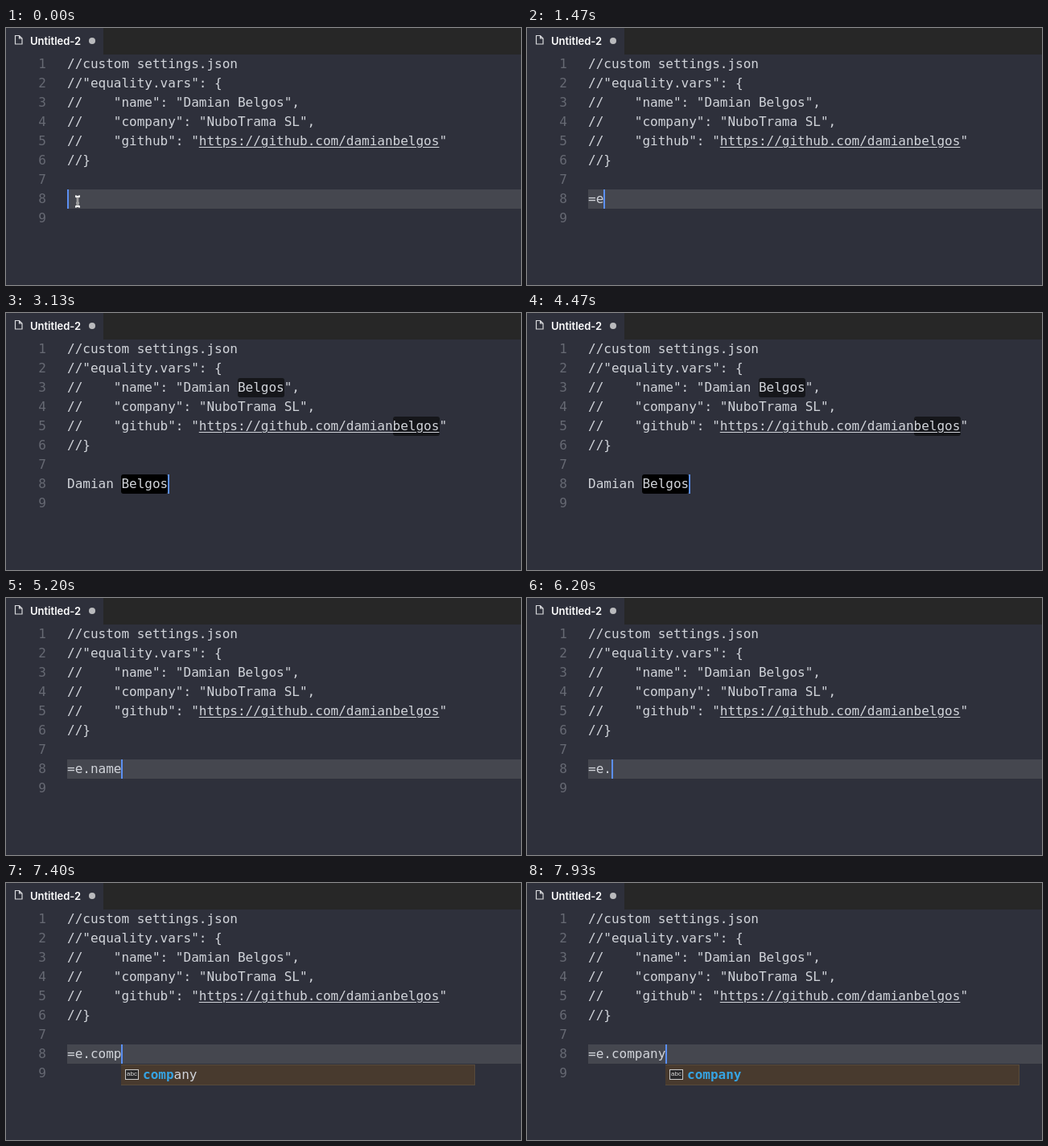
Write an HTML page that moves like this. It is 640 px wide and 320 px high and loops after 8 s.

```html
<!DOCTYPE html>
<html lang="en">
<head>
<meta charset="utf-8">
<title>Editor</title>
<style>
  html, body { margin: 0; width: 100%; height: 100%; overflow: hidden; background: #2e303b; }
  #stage {
    position: relative; width: 640px; height: 320px; overflow: hidden;
    background: #2e303b; color: #d1d4da;
    font: 16px/24px "DejaVu Sans Mono", "Liberation Mono", monospace;
  }
  #stage div, #stage svg { position: absolute; }
  #marks, #code { left: 0; top: 0; }
  .bar { left: 0; top: 0; width: 640px; height: 33px; background: #272727; }
  .tab { left: 0; top: 0; width: 121px; height: 33px; background: #2e303b; }
  .title { left: 30px; top: 4px; color: #fff; font: 600 13px/24px Inter, "Open Sans", sans-serif; white-space: nowrap; }
  .dot { left: 103px; top: 11.5px; width: 8px; height: 8px; border-radius: 50%; background: #b9babd; }
  .num { left: 0; width: 50px; text-align: right; color: #666973; }
  .line { height: 24px; white-space: pre; }
  .line u { text-decoration-thickness: 1px; text-underline-offset: 2px; }
  .mark { height: 24px; width: 58px; border-radius: 3px; background: #15161a; }
  #row { left: 76px; top: 201px; width: 564px; height: 24px; background: #45474f; }
  #caret { top: 201px; width: 2px; height: 24px; background: #5b8ff2; }
  #popup {
    top: 226px; width: 440px; box-sizing: border-box;
    border: 1px solid #574a3b; background: #303031;
  }
  #popup .item { position: relative; height: 24px; margin-left: -1px; padding-left: 27px; line-height: 23px; }
  #popup .item:first-child { background: #483a2e; }
  #popup b { color: #36a3e2; }
  #popup i {
    position: absolute; left: 5px; top: 5px; width: 15px; height: 11px;
    border: 1px solid #c8c8c8; background: #28282a; color: #d8d8d8;
    font: 8px/10px "Liberation Sans", sans-serif; text-align: center;
  }
</style>
</head>
<body>
<div id="stage">
  <div class="bar"></div>
  <div class="tab"></div>
  <svg width="24" height="24" style="left:4px;top:3px" fill="none" stroke="#d8d9dc" stroke-width="1.2">
    <path d="M7.5 6.5h5l3.5 3.5v7h-8.5zM12.5 6.5v3.5h3.5"/>
  </svg>
  <div class="title">Untitled-2</div>
  <div class="dot"></div>
  <div id="row"></div>
  <div id="marks"></div>
  <div id="code"></div>
  <div id="caret"></div>
  <div id="popup"></div>
  <svg id="mouse" width="12" height="18" style="left:83px;top:207px" fill="none">
    <path d="M3 2.5Q6 2.5 6 5Q6 2.5 9 2.5M6 5V13M3 15.5Q6 15.5 6 13Q6 15.5 9 15.5M4.5 11h3" stroke="#f2f2f2" stroke-width="2.4"/>
    <path d="M6 4V14" stroke="#333" stroke-width=".9"/>
  </svg>
</div>
<script>
  const LOOP = 8000, CHAR = 9.632, LEFT = 76, TOP = 33, ROW = 24;
  const FULL = "Damian Belgos";
  const LINES = [
    "//custom settings.json",
    '//"equality.vars": {',
    `//    "name": "${FULL}",`,
    '//    "company": "NuboTrama SL",',
    '//    "github": "<u>https://github.com/damianbelgos</u>"',
    "//}", "", "", ""
  ];
  const WORDS = ["com", "company", "custom", "equality", "name"];

  // time, text on line 8, delay of the suggestion list (none if absent)
  const EDITS = [
    [-600, ""], [1200, "="], [1400, "=e", 125], [2000, "=e."],
    [2325, "=e.n", 0], [2470, "=e.na", 0], [2600, "=e.nam", 0], [2730, "=e.name", 0],
    [2850, FULL], [5000, "=e.name"],
    [5530, "=e.nam"], [5700, "=e.na"], [5865, "=e.n"], [6065, "=e."],
    [6730, "=e.c", 70], [6930, "=e.co", 0], [7130, "=e.com", 0], [7330, "=e.comp", 0],
    [7500, "=e.compa", 0], [7670, "=e.compan", 0], [7865, "=e.company", 0]
  ];
  const MARK_DELAY = 275;

  const $ = id => document.getElementById(id);
  const xAt = col => LEFT + col * CHAR;
  const yAt = row => TOP + row * ROW;

  function add(parent, cls, left, top, html = "") {
    const el = document.createElement("div");
    el.className = cls;
    el.style.left = left + "px";
    el.style.top = top + "px";
    el.innerHTML = html;
    return parent.appendChild(el);
  }

  const lines = LINES.map((text, i) => {
    add($("code"), "num", 0, yAt(i), i + 1);
    return add($("code"), "line", LEFT, yAt(i), text);
  });
  const input = lines[7];
  const selection = add($("marks"), "mark", xAt(7), yAt(7));
  selection.style.background = "#000";
  const matches = [add($("marks"), "mark", xAt(22), yAt(2)), add($("marks"), "mark", xAt(42), yAt(4))];

  // Bold the typed letters in order; null when the word does not match
  function suggest(word, typed) {
    if (word[0] !== typed[0]) return null;
    let n = 0;
    const html = [...word].map(c => c === typed[n] ? (n++, `<b>${c}</b>`) : c).join("");
    return n === typed.length ? `<div class="item"><i>abc</i>${html}</div>` : null;
  }

  function blink(t) {
    if (t < 0) return 1;
    const x = t % 1000 / 500, p = x < 1 ? x : 2 - x;
    const k = Math.min(1, Math.max(0, (p - 0.2) / 0.4));
    return 1 - k * k * (3 - 2 * k);
  }

  const show = (el, on) => { el.style.visibility = on ? "visible" : "hidden"; };
  let listed = "";

  function draw(t) {
    const [start, text, delay] = EDITS.filter(e => e[0] <= t).pop();
    const age = t - start, expanded = text === FULL;

    input.textContent = text;
    $("caret").style.left = Math.round(xAt(text.length) - 0.3) + "px";
    $("caret").style.opacity = blink(age - 500);

    show($("row"), !expanded);
    show(selection, expanded);
    matches.forEach(m => show(m, expanded && age >= MARK_DELAY));
    show($("mouse"), text === "");

    const open = delay !== undefined && age >= delay;
    show($("popup"), open);
    if (!open) return;
    const typed = text.match(/[a-z]*$/)[0];
    if (typed !== listed) {
      $("popup").innerHTML = WORDS.map(w => suggest(w, typed)).filter(Boolean).join("");
      listed = typed;
    }
    $("popup").style.left = Math.round(xAt(text.length)) + "px";
  }

  const origin = performance.now();
  function tick() {
    draw((performance.now() - origin) % LOOP);
    requestAnimationFrame(tick);
  }
  tick();
</script>
</body>
</html>
```
